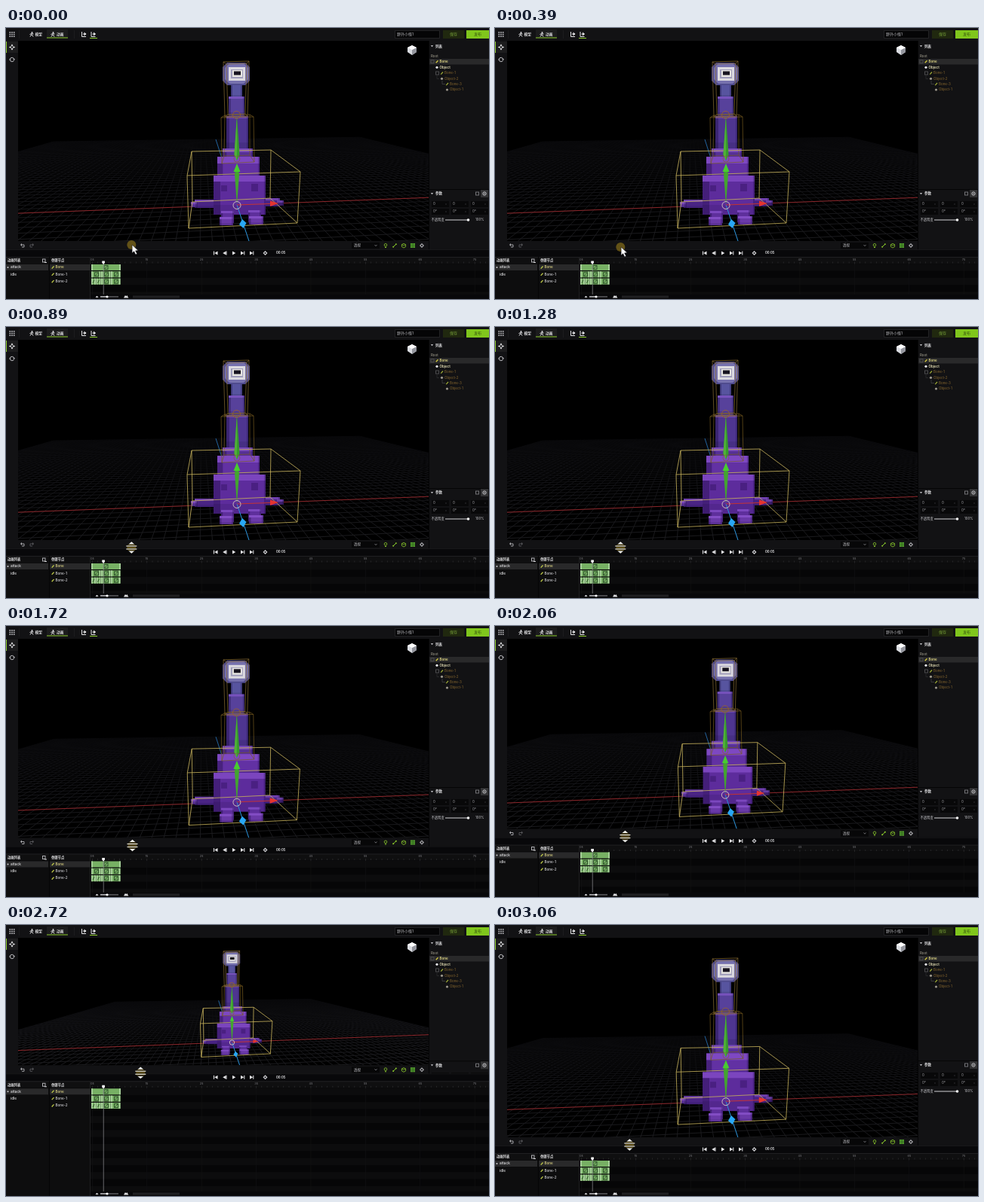
Animation, 640 px wide and 360 px high, one loop 3.12 s. Source, as an HTML page with a canvas:

```html
<!DOCTYPE html>
<html lang="zh">
<head>
<meta charset="utf-8">
<style>
html, body { margin: 0; width: 100%; height: 100%; overflow: hidden; background: #000; }
canvas { display: block; width: 640px; height: 360px; }
</style>
</head>
<body>
<canvas id="stage" width="640" height="360"></canvas>
<script>
const ctx = document.getElementById('stage').getContext('2d');
const LOOP = 3120, STEP = LOOP / 56, PEAK = 97;
const FONT = 'Inter, "Noto Sans CJK SC", "Noto Sans CJK", sans-serif';
const PANEL = '#121214', SELECTED = '#29292a', GREEN = '#8ccc2c';
const WHITE = '#e4e4e6', GREY = '#85858a', GOLD = '#c9b45c';

const ease = (t, a, b) => {
  const u = Math.min(1, Math.max(0, (t - a) / (b - a)));
  return u * u * (3 - 2 * u);
};

function rect(x, y, w, h, color) {
  ctx.fillStyle = color;
  ctx.fillRect(x, y, w, h);
}

function path(points, close) {
  ctx.beginPath();
  points.forEach(([x, y], i) => i ? ctx.lineTo(x, y) : ctx.moveTo(x, y));
  if (close) ctx.closePath();
}

function poly(points, color) {
  path(points, true);
  ctx.fillStyle = color;
  ctx.fill();
}

function line(points, color, width = 1, close = false) {
  path(points, close);
  ctx.strokeStyle = color;
  ctx.lineWidth = width;
  ctx.stroke();
}

function ring(x, y, r, color, width = 1, from = 0, to = 7) {
  ctx.beginPath();
  ctx.arc(x, y, r, from, Math.min(to, from + Math.PI * 2));
  ctx.strokeStyle = color;
  ctx.lineWidth = width;
  ctx.stroke();
}

function dot(x, y, r, color) {
  ctx.beginPath();
  ctx.arc(x, y, r, 0, 7);
  ctx.fillStyle = color;
  ctx.fill();
}

function frame(x, y, w, h, color) {
  ctx.strokeStyle = color;
  ctx.lineWidth = 1;
  ctx.strokeRect(x, y, w, h);
}

function text(str, x, y, color = WHITE, size = 5, weight = 400) {
  ctx.font = `${weight} ${size}px ${FONT}`;
  ctx.textBaseline = 'middle';
  ctx.fillStyle = color;
  ctx.fillText(str, x, y);
}

const caret = (x, y) => poly([[x - 1.6, y - 1], [x + 1.6, y - 1], [x, y + 1.3]], '#c4c4c8');

function clipped(x, y, w, h, draw) {
  ctx.save();
  ctx.beginPath();
  ctx.rect(x, y, w, h);
  ctx.clip();
  draw();
  ctx.restore();
}

// Ground point: u runs along the red axis, v away from the viewer.
function ground(u, v) {
  const d = 1 + u + v;
  return [(306 + 3950 * u + 259 * v) / d, (235 + 95 * u + 94 * v) / d];
}

function drawGrid(px) {
  const n = 44, wide = 0.144, far = 1.611, near = -20;
  const fade = ctx.createLinearGradient(0, 147, 0, 283);
  fade.addColorStop(0, '#08080a');
  fade.addColorStop(0.4, '#111114');
  fade.addColorStop(1, '#1b1b1e');
  for (let i = -n; i <= n; i++) {
    const u = i / n * wide, v = i / n * far;
    line([ground(u, near / n * far), ground(u, far)], fade, px);
    if (i >= near) line([ground(-wide, v), ground(wide, v)], fade, px);
  }
  line([ground(-wide, 0), ground(wide, 0)], '#98282c', px * 0.9);
}

function block(x, y, w, h, color, top = 3) {
  rect(x, y, w, h, color);
  rect(x, y, w, top, 'rgba(170,110,245,.38)');
  rect(x, y + top, w * 0.13, h - top, 'rgba(10,0,40,.3)');
  rect(x, y + h * 0.75, w, h * 0.25, 'rgba(10,0,40,.12)');
  rect(x + w - 2, y, 2, h, 'rgba(10,0,40,.25)');
}

function octagon(x, y, w, h, c, color) {
  poly([[x + c, y], [x + w - c, y], [x + w, y + c], [x + w, y + h - c],
    [x + w - c, y + h], [x + c, y + h], [x, y + h - c], [x, y + c]], color);
}

function drawCreature() {
  block(250, 228, 28, 11, '#4a2484');
  block(245, 231, 8, 7, '#5b3296');
  block(340, 226, 23, 11, '#4a2484');
  block(359, 229, 9, 7, '#402070');
  block(298, 74, 15, 20, '#57549f', 1);
  block(295, 91, 21, 28, '#57419b');
  block(292, 117, 29, 47, '#4e3590');
  block(287, 160, 40, 20, '#563096', 5);
  block(280, 171, 56, 30, '#6231a3', 9);
  block(275, 196, 69, 52, '#5d2c9c', 8);
  rect(285, 209, 8, 8, '#4a2082');
  rect(325, 207, 9, 10, '#4a2082');
  block(285, 243, 17, 16, '#5e2f9c');
  block(283, 251, 18, 11, '#6a39a8');
  block(321, 242, 17, 16, '#5e2f9c');
  block(322, 250, 19, 11, '#6a39a8');
  octagon(287, 46, 36, 30, 6, '#4f4b8e');
  octagon(290, 47, 31, 27, 6, '#7671ae');
  rect(295, 52, 22, 18, '#dcdadf');
  rect(298, 55, 16, 12, '#9f9cba');
  rect(300, 56, 13, 9, '#e6e4e0');
  rect(302, 57.5, 9, 5, '#17131f');
}

function wireBox(a, b, color, px) {
  line(a, color, px, true);
  line(b, color, px, true);
  a.forEach((p, i) => line([p, b[i]], color, px));
}

function drawScene(k) {
  const px = 1 / k;
  drawGrid(px);
  line([[278, 148], [306, 235]], '#22639e', px);
  drawCreature();
  wireBox([[288, 45], [322, 44], [319, 47], [292, 48]],
    [[290, 118], [320, 117], [317, 114], [294, 115]], '#8a6e34', px * 0.7);
  wireBox([[285, 119], [328, 118], [323, 115], [290, 116]],
    [[286, 180], [329, 178], [323, 169], [289, 170]], '#75591f', px * 0.7);
  wireBox([[240, 196], [390, 191], [351, 162], [246, 164]],
    [[242, 266], [386, 259], [350, 226], [247, 231]], GOLD, px * 0.8);
  line([[306, 235], [322, 283]], '#2790d8', px);
  line([[306, 235], [352, 233.4]], '#c23230', px);
  poly([[306, 117], [309.5, 168], [306, 176], [302.5, 168]], '#379b2c');
  poly([[306, 117], [306, 176], [302.5, 168]], '#50b038');
  ring(305.5, 115.5, 5, '#96622a', px * 0.9);
  ring(306, 174, 4, '#85613a', px * 0.7);
  poly([[306, 181], [309, 194], [306, 235], [303, 194]], '#43a42f');
  poly([[306, 180], [310.5, 191], [301.5, 191]], '#48cc30');
  poly([[350, 229.5], [361, 233], [350, 237]], '#e43430');
  poly([[313, 254], [318.5, 259], [314.5, 266], [309, 261]], '#29a7f5');
  ring(306, 235.5, 5, '#d8cdc0', px * 0.9);
}

function drawViewport(s) {
  const h = 266 - s, k = h / 266;
  clipped(16, 17, 544, h, () => {
    rect(16, 17, 544, h, '#000');
    ctx.translate(288, 17);
    ctx.scale(k, k);
    ctx.translate(-288, -17);
    drawScene(k);
  });
  poly([[538, 23], [544, 26], [544, 32], [538, 36], [532, 32], [532, 26]], '#d9dbe0');
  poly([[538, 29], [544, 26], [544, 32], [538, 36]], '#94969e');
  poly([[538, 23], [544, 26], [538, 29], [532, 26]], '#fff');
}

function person(x, y, color) {
  dot(x + 0.5, y - 2.5, 1, color);
  line([[x - 2.5, y], [x, y - 1], [x + 2.5, y - 0.5]], color);
  line([[x - 2, y + 3], [x, y], [x + 2, y + 3]], color);
}

function drawTop() {
  rect(0, 0, 640, 17, PANEL);
  for (let i = 0; i < 9; i++) rect(4.5 + i % 3 * 2.7, 5 + Math.floor(i / 3) * 2.7, 1.6, 1.6, '#c4c4c8');
  rect(17, 3, 1, 11, '#1c1c1e');
  person(34, 8.5, WHITE);
  text('模型', 38.5, 8.5, WHITE, 4.7, 600);
  rect(54, 2, 28, 11, '#1c1c1d');
  person(62, 8.5, WHITE);
  text('动画', 67, 8.5, WHITE, 4.7, 600);
  rect(54, 12.5, 28, 1, GREEN);
  rect(90, 3, 1, 11, '#1c1c1e');
  for (const x of [103, 115.5]) {
    line([[x - 2.5, 5], [x - 2.5, 11.5], [x + 3, 11.5]], WHITE);
    line([[x - 1, 8], [x + 3, 8]], WHITE);
    poly([[x + 0.5, 5.5], [x + 3.5, 8], [x + 0.5, 10.5]], WHITE);
  }
  rect(111, 13, 10, 1, GREEN);
  rect(515, 3, 60, 11, '#050506');
  frame(515.5, 3.5, 59, 10, '#222224');
  text('野外小怪1', 518, 8.5, '#b4b4b8', 5);
  rect(579, 3, 28, 11, '#20280f');
  text('保存', 588, 8.5, '#7ba63a', 5);
  rect(610, 3, 30, 11, '#80c61c');
  text('发布', 620, 8.5, '#35520f', 5);
}

function drawLeft(s) {
  rect(0, 17, 16, 278 - s, PANEL);
  rect(0, 18, 16, 15, '#1d1d1e');
  rect(0, 18, 1, 15, GREEN);
  for (const [dx, dy] of [[1, 0], [-1, 0], [0, 1], [0, -1]]) {
    const x = 8 + dx * 3.7, y = 25.5 + dy * 3.7;
    line([[8 + dx, 25.5 + dy], [x, y]], WHITE);
    poly([[x, y], [x - dx * 2 + dy * 1.6, y - dy * 2 + dx * 1.6],
      [x - dx * 2 - dy * 1.6, y - dy * 2 - dx * 1.6]], WHITE);
  }
  ring(8, 42, 2.7, '#c0c0c4', 1, 0.3, 2.9);
  ring(8, 42, 2.7, '#c0c0c4', 1, 3.4, 6);
  poly([[9.3, 41], [12, 41], [10.6, 43]], '#c0c0c4');
  poly([[4, 42.5], [6.7, 42.5], [5.4, 40.5]], '#c0c0c4');
}

function bone(x, y, color) {
  line([[x - 1.3, y + 1.6], [x + 1.5, y - 1.5]], color, 1.3);
}

function drawParams(y) {
  rect(561, y - 6, 79, 82, PANEL);
  rect(561, y - 6, 79, 1, '#050506');
  caret(564.5, y);
  text('参数', 569, y, WHITE, 4.5, 600);
  rect(629, y - 5, 10, 10, '#333335');
  frame(622.5, y - 2, 4, 4, '#727276');
  ring(634, y, 2.2, '#d0d0d4', 0.9);
  dot(634, y, 0.7, WHITE);
  for (const [dy, value] of [[14, '0'], [24, '0°']]) {
    for (let i = 0; i < 3; i++) {
      const x = 564 + i * 26;
      rect(x, y + dy - 4, 23, 8, '#080809');
      text(value, x + 2, y + dy, '#a8a8ac', 4.5);
      text('x', x + 18, y + dy, '#434346', 3.5);
    }
  }
  text('不透明度', 563.5, y + 35, '#c4c4c8', 4.3);
  rect(582, y + 34.5, 31, 1, '#d2d2d6');
  dot(612.5, y + 35, 1.8, '#fff');
  text('100%', 622, y + 35, '#c4c4c8', 4.3);
}

function drawRight(s, paramY) {
  clipped(560, 17, 80, 277 - s, () => {
    rect(560, 17, 80, 280, PANEL);
    rect(560, 17, 1, 280, '#050506');
    caret(564.5, 24);
    text('列表', 569, 24.2, WHITE, 4.5, 600);
    text('Root', 563, 37.5, '#b2ae9c', 4.5);
    rect(561, 41, 79, 7.5, SELECTED);
    const rows = [['Bone', 574.5, 44.7, '#e6dc88', 1], ['Object', 574.5, 52.3, '#e8e2b8', 0],
      ['Bone-1', 581, 60, '#88682f', 1], ['Object-2', 581, 67.3, '#88682f', 0],
      ['Bone-3', 588, 74.5, '#88682f', 1], ['Object-1', 588, 82, '#88682f', 0]];
    rows.forEach(([name, x, y, color, isBone], i) => {
      text(name, x, y, color, 4.5, i < 2 ? 600 : 400);
      if (isBone) {
        bone(x - 3.5, y, i ? '#98a634' : '#d3c83c');
        if (i < 4) frame(x - 11.5, y - 2, 4, 4, '#4a4a4c');
      } else dot(x - 3.5, y, 1.6, i < 2 ? WHITE : '#9c978c');
    });
    line([[571, 63], [571, 67.5], [574, 67.5]], '#303032', 0.7);
    line([[578, 70], [578, 74.5], [582, 74.5]], '#48484a', 0.7);
    drawParams(paramY);
  });
}

function drawTools(s) {
  const y = 289 - s;
  rect(0, 283 - s, 560, 12, PANEL);
  for (const [x, d, c] of [[22, -1, '#aeaeb2'], [34, 1, '#58585c']]) {
    line([[x + 2 * d, y - 1], [x - 2 * d, y - 1], [x - 2 * d, y + 2], [x + d, y + 2]], c, 0.9);
    poly([[x + 3 * d, y - 1], [x + d, y - 3], [x + d, y + 1]], c);
  }
  rect(458, y - 4, 37, 8, '#070708');
  text('透视', 461, y, '#c4c4c8', 4.5);
  line([[488.5, y - 1], [490, y + 0.7], [491.5, y - 1]], GREY, 0.8);
  ring(503, y - 0.7, 1.8, GREEN, 0.8);
  rect(502, y + 2, 2, 1, GREEN);
  line([[513, y + 2], [517, y - 2]], GREEN);
  dot(513.2, y + 1.8, 1, GREEN);
  dot(516.8, y - 1.8, 1, GREEN);
  line([[527, y - 2.7], [529.6, y - 1.3], [529.6, y + 1.6], [527, y + 3],
    [524.4, y + 1.6], [524.4, y - 1.3]], GREEN, 0.8, true);
  line([[524.4, y - 1.3], [527, y], [529.6, y - 1.3]], GREEN, 0.7);
  rect(536, y - 3, 6, 6, '#5fae35');
  for (const d of [1.7, 3.7]) {
    rect(536 + d, y - 3, 0.7, 6, '#285c18');
    rect(536, y - 3 + d, 6, 0.7, '#285c18');
  }
  poly([[551, y - 3], [554, y], [551, y + 3], [548, y]], '#b4b4b8');
  dot(551, y, 1.3, '#28282a');
}

function drawPlayback(s) {
  const y = 299 - s;
  rect(0, 294 - s, 640, 10, '#08080a');
  rect(0, 294 - s, 640, 1, '#18181a');
  const tri = (x, d) => poly([[x - 2 * d, y - 2.5], [x + 2.3 * d, y], [x - 2 * d, y + 2.5]], WHITE);
  tri(278.5, -1); rect(275, y - 2.5, 1, 5, WHITE);
  tri(289.5, -1); rect(291.5, y - 2.5, 1, 5, WHITE);
  tri(302, 1);
  tri(313, 1); rect(315.3, y - 2.5, 1, 5, WHITE);
  tri(325, 1); rect(327.3, y - 2.5, 1, 5, WHITE);
  poly([[343.5, y - 3], [346.5, y], [343.5, y + 3], [340.5, y]], '#d0d0d4');
  dot(343.5, y, 1.1, '#121214');
  text('00:05', 358, y, WHITE, 4.3, 600);
}

function clip(x, y, w) {
  rect(x, y, w, 8, '#77b064');
  rect(x, y, 2, 8, '#a5d098');
  rect(x + w - 2, y, 2, 8, '#a5d098');
}

function curveIcon(x, y) {
  frame(x - 2.5, y - 2.5, 5, 5, '#30542c');
  line([[x - 2, y + 2], [x + 2, y - 2]], '#30542c', 0.9);
}

function drawTimeline(s) {
  const y = 304 - s;
  rect(0, y, 640, 360 - y, '#060607');
  for (let by = y + 9.3; by < 354; by += 18.6) rect(112, by, 528, 9.3, '#0c0c0d');
  rect(0, y, 640, 9, '#0f0f10');
  rect(0, y, 640, 1, '#202022');
  rect(0, y + 9, 111, 360 - y - 9, '#0d0d0e');
  for (let i = 0; i < 8; i++) {
    const x = 114 + i * 72.4;
    rect(x, y + 9, 0.7, 360 - y, '#121213');
    text(i + 's', x - 2, y + 3.5, '#77777b', 4);
    for (let j = 0; j < 10; j++) rect(x + j * 7.24, y + 6.5, 0.7, j ? 2 : 3, '#303032');
  }
  text('动画列表', 2, y + 5, WHITE, 4.3, 600);
  text('骨骼节点', 60, y + 5, WHITE, 4.3, 600);
  frame(48.5, y + 3, 3.5, 4, '#aeaeb2');
  line([[51, y + 7.5], [54, y + 7.5]], WHITE, 0.9);
  rect(0, y + 10, 56, 8, SELECTED);
  rect(58, y + 10, 53, 8, SELECTED);
  rect(57, y, 1, 360 - y, '#050506');
  rect(111, y, 1, 360 - y, '#1e1e20');
  dot(2.5, y + 14, 1, '#d0d0d4');
  text('attack', 6, y + 14, WHITE, 4.7, 500);
  text('idle', 6, y + 23.3, WHITE, 4.7, 500);
  ['Bone', 'Bone-1', 'Bone-2'].forEach((name, i) => {
    const ty = y + 14 + i * 9.3;
    bone(62, ty, '#c0cc48');
    text(name, 65.5, ty, i ? '#d8d8dc' : '#e6dc88', 4.6, 500);
  });
  clip(113, y + 10, 39);
  curveIcon(132.5, y + 14);
  for (let i = 0; i < 3; i++) {
    const x = 113 + i * 13;
    clip(x, y + 19.3, 12.5);
    curveIcon(x + 7, y + 23.3);
    if (i) {
      clip(x, y + 28.7, 12.5);
      curveIcon(x + 7, y + 32.7);
    }
  }
  for (const x of [113, 119.5]) {
    clip(x, y + 28.7, 6);
    line([[x + 2, y + 35], [x + 4, y + 30.5]], '#30542c');
  }
  rect(128.8, y + 8, 0.7, 360 - y, '#909096');
  poly([[127.3, y + 5.5], [130.9, y + 5.5], [130.9, y + 8], [129.1, y + 10], [127.3, y + 8]], '#fff');
  rect(112, 354, 528, 6, '#08080a');
  poly([[118.5, 358], [120.5, 355.7], [122.5, 358]], WHITE);
  rect(125, 356.5, 24, 1, '#85858a');
  rect(125, 356.5, 9, 1, WHITE);
  dot(134, 357, 1.6, '#fff');
  poly([[156, 358.5], [158, 355], [159.3, 356.5], [160.3, 355], [162.3, 358.5]], WHITE);
  rect(168, 355.5, 62, 3, '#202022');
}

function drawCursor(t, s) {
  const x = 166.3 + 1.2 * ease(t, 1500, 1720) + 10.8 * ease(t, 1780, 2380);
  if (t < 560) {
    const y = 288 + 3 * ease(t, 100, 390);
    dot(x, y, 6, 'rgba(165,135,25,.55)');
    const arrow = [[0, 0], [0, 11], [2.5, 8.7], [4.6, 13], [6.6, 12], [4.5, 7.9], [8, 7.6]]
      .map(([dx, dy]) => [x + 0.8 + dx, y + dy]);
    poly(arrow, '#fff');
    line(arrow, '#17171b', 0.6, true);
    return;
  }
  const y = 293 - s;
  dot(x, y, 6, 'rgba(165,135,25,.55)');
  for (const d of [-1, 1]) {
    const tri = [[x, y + d * 7.8], [x - 3.8, y + d * 4.6], [x + 3.8, y + d * 4.6]];
    line(tri, '#111', 1.2, true);
    poly(tri, '#f0f0ec');
    rect(x - 7, y + d * 2 - 1.1, 14, 2.2, '#17160f');
    rect(x - 7, y + d * 2 - 0.6, 14, 1.2, '#e6e2d2');
  }
}

function shiftAt(t) {
  if (t < 1700) return 0;
  if (t < 2700) return 1.5 + (PEAK - 1.5) * ease(t, 1880, 2700);
  return PEAK - (PEAK - 1) * ease(t, 2700, 3040);
}

function draw(t) {
  const s = shiftAt(t);
  // The lower section is pushed up by the splitter and stays there.
  const paramY = Math.min(220, 283 - (t > 2700 ? PEAK : s));
  rect(0, 0, 640, 360, '#000');
  drawViewport(s);
  drawTop();
  drawLeft(s);
  drawTools(s);
  drawPlayback(s);
  drawRight(s, paramY);
  drawTimeline(s);
  drawCursor(t, s);
}

const start = performance.now();
function tick() {
  const t = (performance.now() - start) % LOOP;
  draw(Math.min(55, Math.floor((t + 8) / STEP)) * STEP);
  requestAnimationFrame(tick);
}
tick();
</script>
</body>
</html>
```
